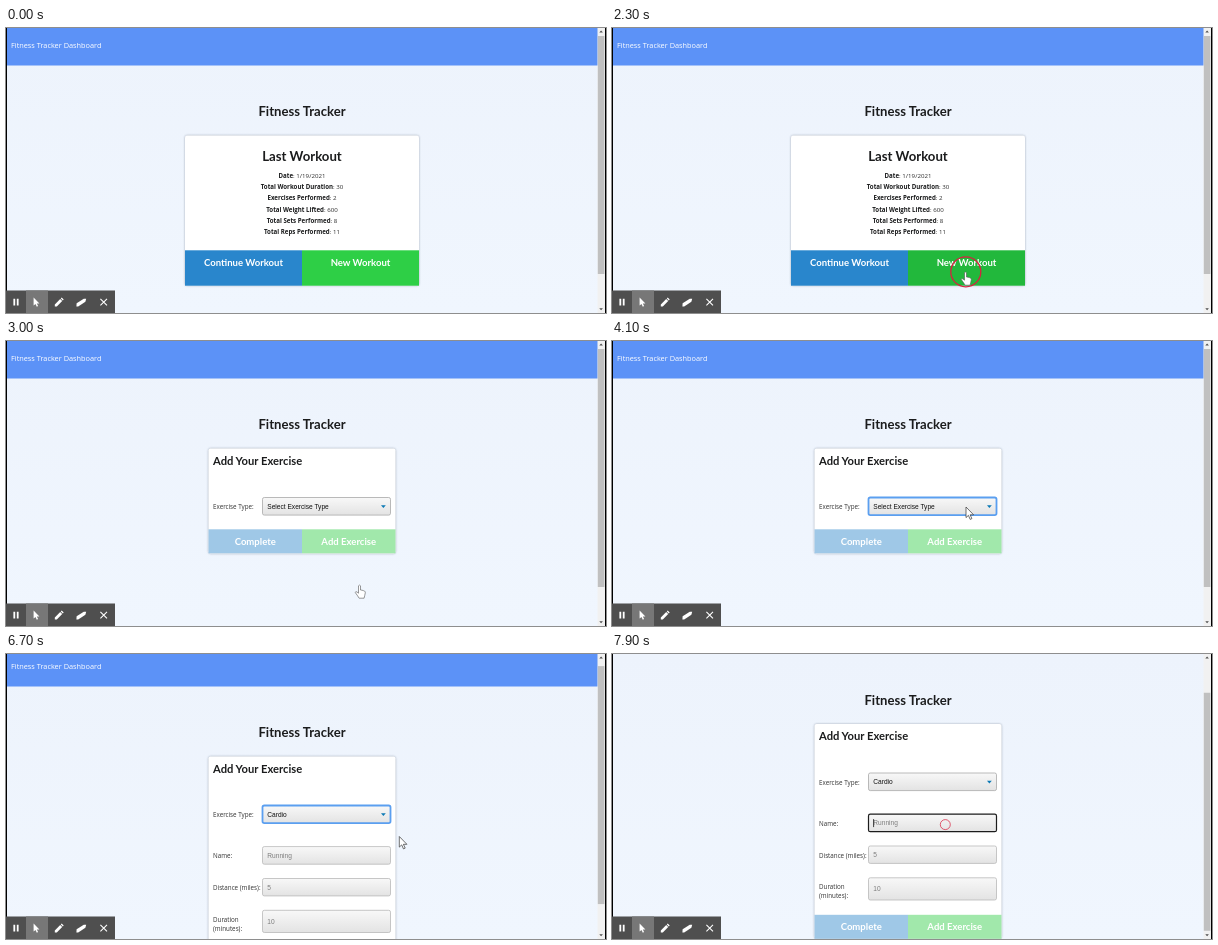
Animation, 600 px wide and 285 px high, one loop 8000 ms. Source, as an HTML page:

```html
<!DOCTYPE html>
<html lang="en">
<head>
<meta charset="utf-8">
<title>Fitness Tracker</title>
<style>
  html, body { margin: 0; width: 100%; height: 100%; overflow: hidden; background: #eff5fd; }
  svg { display: block; width: 600px; height: 285px; }
  text { white-space: pre; }
  .head { font-family: Lato, sans-serif; font-weight: 700; fill: #1b1c1d; }
  .btn { font: 700 9.55px Lato, sans-serif; fill: #fff; text-anchor: middle; }
  .nav { font: 7.35px "Open Sans", sans-serif; fill: #fff; }
  .stat { font: 6.15px "Open Sans", sans-serif; fill: #2c2c2c; text-anchor: middle; }
  .stat tspan { font-weight: 700; fill: #1b1c1d; }
  .label { font: 6.25px "Open Sans", sans-serif; fill: #333; }
  .value { font: 6.6px "Liberation Sans", Arial, sans-serif; fill: #111; }
  .hint { fill: #7d7d7d; }
  .mid { text-anchor: middle; }
  .card { fill: #fff; filter: drop-shadow(0 .6px 1.2px rgba(60, 70, 90, .45)); }
</style>
</head>
<body>
<svg viewBox="0 0 600 285" xmlns="http://www.w3.org/2000/svg">
  <defs>
    <linearGradient id="sky" x2="0" y2="1">
      <stop stop-color="#edf3fc"/><stop offset="1" stop-color="#f0f6fe"/>
    </linearGradient>
    <linearGradient id="field" x2="0" y2="1">
      <stop stop-color="#f8f8f8"/><stop offset="1" stop-color="#e3e3e3"/>
    </linearGradient>
  </defs>
  <rect width="600" height="285" fill="url(#sky)"/>
  <g id="page">
    <rect width="592" height="37.5" fill="#5c92f7"/>
    <text class="nav" x="5" y="19.6">Fitness Tracker Dashboard</text>
    <text class="head mid" x="296" y="88" font-size="13.1">Fitness Tracker</text>
    <g id="home"></g>
    <g id="form"></g>
  </g>
  <rect x="591.5" width="7.5" height="285" fill="#f1f1f1"/>
  <rect id="thumb" x="591.8" y="8" width="6.6" height="238" fill="#c0c0c0"/>
  <path d="M593.3 4.6l1.8-2 1.8 2zM593.3 280.2l1.8 2 1.8-2z" fill="#505050"/>
  <path d="M.5 0V285M599.5 0V285" stroke="#000"/>
  <g id="tools">
    <rect y="262.5" width="109" height="22.5" fill="#4f4f4f"/>
    <rect x="20" y="262.5" width="22" height="22.5" fill="#777"/>
    <g fill="#fff">
      <path d="M7.4 270.8h1.8v6.6h-1.8zM10.8 270.8h1.8v6.6h-1.8z"/>
      <path d="M27.6 269.6v8l1.9-1.7 1.3 2.8 1.3-.6-1.3-2.7h2.6z"/>
      <path d="M48.8 278.4v-2l5.4-5.4 2 2-5.4 5.4zM54.8 270.4l.9-.9 2 2-.9.9z"/>
      <path d="M70.6 275.2l7.2-4.4 2.4 0-.8 3-7.2 4.6-1.8 0z"/>
    </g>
    <path d="M94.4 270.8l6.6 6.6M101 270.8l-6.6 6.6" stroke="#fff" stroke-width="1.1"/>
  </g>
  <circle id="ring" fill="none" stroke="#d9203f"/>
  <path id="arrow" d="M0 0v10.6l2.4-2.2 1.8 4 1.7-.8-1.8-3.8h3.5z"
        fill="#fff" stroke="#333" stroke-width=".7" stroke-linejoin="round"/>
  <path id="hand" d="M-1 .8q1-1.400 2 0v4.200l1.400.2 1.500.4 1.300.6q.8.5.6 1.600l-.6 2.800-.6 2.600h-5l-1.500-2.400-2.300-3.200q.2-1.600 1.700-.6l1.500 1.200z"
        fill="#fff" stroke="#555" stroke-width=".6" stroke-linejoin="round"/>
</svg>
<script>
const $ = id => document.getElementById(id);
const LOOP = 8000, STEP = 100, MAX_SCROLL = 37.5;

const rect = (x, y, w, h, rest = '') =>
  `<rect x="${x}" y="${y}" width="${w}" height="${h}" ${rest}/>`;
const text = (cls, x, y, body, rest = '') =>
  `<text class="${cls}" x="${x}" y="${y}" ${rest}>${body}</text>`;
const button = (x, y, w, h, textY, color, label, id = '') =>
  rect(x, y, w, h, `fill="${color}" id="${id}"`) + text('btn', x + w / 2, textY, label);
const box = (y, h, id = '') =>
  rect(256.5, y, 128, h, `rx="1.8" fill="url(#field)" stroke="#b9b9b9" stroke-width=".8" id="${id}"`);
const field = (y, h, hint, id) => box(y, h, id) + text('value hint', 261.3, y + h / 2 + 2.3, hint);

const stats = [
  ['Date', '1/19/2021'], ['Total Workout Duration', 30], ['Exercises Performed', 2],
  ['Total Weight Lifted', 600], ['Total Sets Performed', 8], ['Total Reps Performed', 11]
];

$('home').innerHTML =
  rect(179, 107.5, 234, 150, 'rx="2" class="card"') +
  text('head mid', 296, 132.6, 'Last Workout', 'font-size="13.2"') +
  stats.map(([name, value], i) =>
    text('stat', 296, 149.7 + i * 11.35, `<tspan>${name}</tspan>: ${value}`)).join('') +
  button(179, 222.3, 117, 35.4, 238.3, '#2986cc', 'Continue Workout') +
  button(296, 222.3, 117, 35.4, 238.3, '#2ecf46', 'New Workout', 'start');

$('form').innerHTML =
  rect(202.5, 107.5, 187, 105, 'rx="2" class="card" id="panel"') +
  text('head', 207, 123.5, 'Add Your Exercise', 'font-size="11.2"') +
  text('label', 207, 168.3, 'Exercise Type:') +
  box(156.5, 17.6, 'select') +
  text('value', 261.3, 167.6, '', 'id="choice"') +
  '<path d="M375 164.200h4.800l-2.400 2.800z" fill="#0b79b5"/>' +
  '<g id="cardio">' +
    text('label', 207, 209.3, 'Name:') + field(197.6, 17.6, 'Running', 'name') +
    text('label', 207, 241.1, 'Distance (miles):') + field(229.5, 17.4, '5') +
    text('label', 207, 272.9, 'Duration') + text('label', 207, 281.6, '(minutes):') +
    field(261.3, 22.2, '10') +
    '<path id="caret" d="M261.600 202.600v8" stroke="#111" stroke-width=".8"/>' +
  '</g><g id="actions">' +
    button(202.5, 188.3, 93.5, 24, 203.9, '#9fc8e7', 'Complete') +
    button(296, 188.3, 93.5, 24, 203.9, '#a1e8ab', 'Add Exercise') +
  '</g>';

// Pointer legs: start, end, from, to, shape, time the pointer rests there until
const legs = [
  { at: 1000, end: 1600, from: [340, 272], to: [353.5, 244], until: 3300, hand: true },
  { at: 3300, end: 3900, from: [354, 240], to: [354, 166], until: 5700 },
  { at: 5700, end: 5700, from: [295, 215], to: [295, 215], until: 6300 },
  { at: 6500, end: 6700, from: [345, 199], to: [393.3, 182.5], until: 7100 },
  { at: 7100, end: 7500, from: [388, 182], to: [333, 170], until: 8000, hideIn: true }
];
const clicks = [[2300, 353.8, 243.8], [5100, 359, 171.5], [7800, 333.3, 170.6]];
const scrollSteps = [[6700, 5], [6800, 25], [6900, MAX_SCROLL]];

const ease = p => p * p * (3 - 2 * p);
const show = (id, on) => $(id).setAttribute('visibility', on ? 'inherit' : 'hidden');
const set = (id, attrs) => {
  for (const key in attrs) $(id).setAttribute(key, attrs[key]);
};

function drawPointer(t) {
  const leg = legs.find(l => t >= l.at && t < l.until);
  show('arrow', false);
  show('hand', false);
  if (!leg) return false;
  const p = leg.end > leg.at ? ease(Math.min(1, (t - leg.at) / (leg.end - leg.at))) : 1;
  const [x, y] = leg.from.map((v, i) => v + (leg.to[i] - v) * p);
  const over = leg.hand && y < 257;
  const inField = leg.hideIn && x < 384 && y > 160 && y < 178;
  const shape = over ? 'hand' : 'arrow';
  set(shape, { transform: `translate(${x} ${y})` });
  show(shape, !inField);
  return over;
}

function drawRing(t) {
  const hit = clicks.find(([at]) => t >= at && t < at + 200);
  show('ring', hit);
  if (!hit) return;
  const late = t - hit[0] >= 100;
  set('ring', {
    cx: hit[1], cy: hit[2], r: late ? 5 : 15,
    'stroke-width': late ? .9 : 1.3, 'stroke-opacity': late ? .8 : 1
  });
}

function draw(t) {
  const onForm = t >= 2600, open = t >= 5700, typing = t >= 7800;
  const selected = t >= 4000 && !typing;
  const scroll = scrollSteps.reduce((s, [at, y]) => t >= at ? y : s, 0);

  set('page', { transform: `translate(0 ${-scroll})` });
  set('thumb', { y: 8 + scroll * .82 });
  show('home', !onForm);
  show('form', onForm);
  show('cardio', onForm && open);
  show('caret', onForm && typing);
  set('panel', { height: open ? 214.5 : 105 });
  set('actions', { transform: `translate(0 ${open ? 110 : 0})` });
  $('choice').textContent = open ? 'Cardio' : 'Select Exercise Type';
  set('select', { stroke: selected ? '#5b9ff0' : '#a9a9a9', 'stroke-width': selected ? 1.8 : .8 });
  set('name', { stroke: typing ? '#1c1c1c' : '#b9b9b9', 'stroke-width': typing ? 1.2 : .8 });

  const hover = drawPointer(t);
  set('start', { fill: hover ? '#22b83c' : '#2ecf46' });
  drawRing(t);
}

const began = performance.now();
function tick(now) {
  const t = Math.max(0, now - began) % LOOP;
  draw(Math.floor(t / STEP) * STEP);
  requestAnimationFrame(tick);
}
draw(0);
requestAnimationFrame(tick);
</script>
</body>
</html>
```
